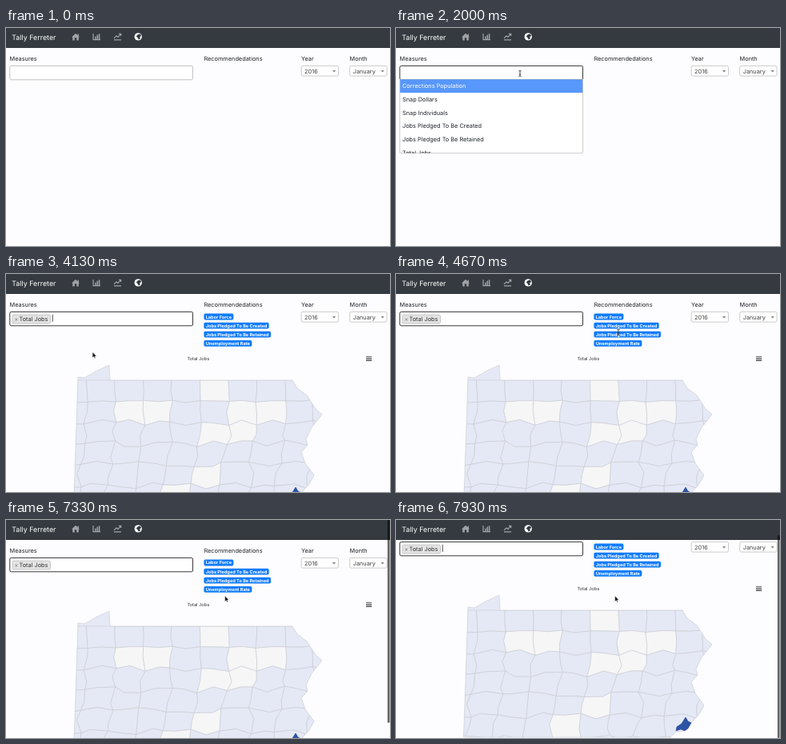
Recreate the animation shown at these times as an HTML page. Size 480 by 273 pixels, loop 8 s.

```html
<!DOCTYPE html>
<html lang="en">
<head>
<meta charset="utf-8">
<title>Measures map</title>
<style>
  html, body { margin: 0; width: 100%; height: 100%; overflow: hidden; background: #fdfcfe; }
  svg { display: block; width: 100%; height: 100%; }
  text {
    font-family: Inter, Roboto, sans-serif; font-size: 7.35px; fill: #212529;
    white-space: pre; text-rendering: geometricPrecision;
  }
</style>
</head>
<body>
<svg id="stage" viewBox="0 0 480 273"></svg>
<script>
const LOOP = 8000;
const ROW = 16.65, MENU_TOP = 64.5;
const stage = document.getElementById('stage');

function add(parent, tag, attrs = {}, text) {
  const el = document.createElementNS('http://www.w3.org/2000/svg', tag);
  for (const k in attrs) el.setAttribute(k, attrs[k]);
  if (text !== undefined) el.textContent = text;
  parent.appendChild(el);
  return el;
}
const group = (parent, attrs) => add(parent, 'g', attrs);
const path = (parent, d, attrs) => add(parent, 'path', { d, ...attrs });
const box = (parent, x, y, width, height, attrs) => add(parent, 'rect', { x, y, width, height, ...attrs });
const label = (parent, x, y, text, style = '') => add(parent, 'text', { x, y, style }, text);
const show = (el, on) => el.setAttribute('display', on ? 'inline' : 'none');

// Page
box(stage, 0, 0, 480, 273, { fill: '#fdfcfe' });
const page = group(stage);
label(page, 4.6, 40.7, 'Measures');
label(page, 247.4, 40.7, 'Recommendedations');
label(page, 369, 40.7, 'Year');
label(page, 429.6, 40.7, 'Month');

function select(x, value) {
  box(page, x, 47.4, 46.3, 12.7, { rx: 1.8, fill: '#fff', stroke: '#aaa', 'stroke-width': .6 });
  label(page, x + 3.9, 56.7, value, 'fill:#444');
  path(page, `M${x + 38.7} 52.9h4.4l-2.2 2.5z`, { fill: '#888' });
}
select(369.2, '2016');
select(429.8, 'January');

const field = box(page, 4.8, 47.4, 228.7, 17.4, { rx: 1.8, fill: '#fff' });
const typed = label(page, 7.6, 58.4, '');

const tag = group(page);
box(tag, 8, 51.2, 47.5, 10.8, { rx: 1.8, fill: '#e4e4e4', stroke: '#aaa', 'stroke-width': .6 });
label(tag, 10.6, 59.3, '×', 'fill:#999;font-weight:700;font-size:7px');
label(tag, 16.5, 59.3, 'Total Jobs', 'fill:#333');
const caret = box(page, 57.8, 50.8, .8, 9, { fill: '#222' });

// Recommendations and chart heading
const results = group(page);
['Labor Force', 'Jobs Pledged To Be Created', 'Jobs Pledged To Be Retained', 'Unemployment Rate'].forEach((name, i) => {
  const y = 49.6 + i * 11.1;
  const badge = box(results, 247.4, y, 0, 7.8, { rx: 1.8, fill: '#0f7bfa' });
  const text = label(results, 249.7, y + 5.9, name, 'fill:#fff;font-weight:700;font-size:5.6px');
  badge.setAttribute('width', text.getComputedTextLength() + 4.7);
});
add(results, 'text', { x: 240.3, y: 107.9, 'text-anchor': 'middle', style: 'font-size:5.7px;fill:#333' }, 'Total Jobs');
path(results, 'M450 103.8h7.2m-7.2 2.3h7.2m-7.2 2.3h7.2', { stroke: '#444', 'stroke-width': 1.1 });

// Map: a jittered grid of counties clipped to the state outline
const border = 'M90 109L98 110 114 101 129 94 130 113H358L364 123 376 132 387 149 395 156' +
  ' 382 172 375 187 377 194 369 203 374 217 385 232 379 243 369 254 361 264 350 265 343 272H84.5L86 230Z';
const clip = add(add(stage, 'defs'), 'clipPath', { id: 'state' });
path(clip, border);

let seed = 11;
function jitter(size) {
  seed = (seed * 16807) % 2147483647;
  return (seed / 2147483647 - .5) * 2 * size;
}

const COLS = 10, ROWS = 6, STEP_X = 17.75, STEP_Y = 13.25;
const line = { stroke: '#c8cad1', 'stroke-width': .6, 'stroke-linejoin': 'round' };
const map = group(results, { transform: 'translate(0 20)' });
path(map, border, { fill: '#e5e9f5' });
const counties = group(map, { 'clip-path': 'url(#state)', ...line });

// Two grid steps per county, so every edge has a bend; the south leans west
const nodes = [];
for (let q = 0; q <= 2 * ROWS; q++) {
  const rough = Math.min(q, 5) * .9, lean = 2 * Math.max(0, q - 5);
  nodes.push(Array.from({ length: 2 * COLS + 1 }, (_, p) =>
    [65 + p * STEP_X - lean + jitter(rough), 113 + q * STEP_Y + jitter(rough)]));
}
const ring = (c, r) => [[0, 0], [1, 0], [2, 0], [2, 1], [2, 2], [1, 2], [0, 2], [0, 1]]
  .map(([p, q]) => nodes[2 * r + q][2 * c + p]);

const empty = ['5,0', '2,1', '3,1', '6,1', '7,1', '5,2', '6,2', '5,4', '4,5'];
for (let r = 0; r < ROWS; r++) {
  for (let c = 0; c < COLS; c++) {
    const fill = empty.includes(`${c},${r}`) ? '#f6f6f7' : '#e5e9f5';
    path(counties, `M${ring(c, r).join('L')}Z`, { fill });
  }
}
path(map, border, { fill: 'none', ...line });
path(map, 'M350 264L351 259 357 255 362 247 365 252 369 254 365 261 361 264 356 262Z',
  { fill: '#2d53a5', stroke: '#24468f', 'stroke-width': .6 });

// Dropdown
const menu = group(stage);
const menuBox = box(menu, 4.8, MENU_TOP, 228.7, 50, { fill: '#fff', stroke: '#aaa', 'stroke-width': .6, rx: 1 });
const hover = box(menu, 5.1, 0, 228.1, ROW, { fill: '#5897fb' });
const menuClip = add(add(stage, 'defs'), 'clipPath', { id: 'menu' });
box(menuClip, 4, MENU_TOP, 230, 92.2);
const rowsBox = group(menu, { 'clip-path': 'url(#menu)' });
const options = ['Corrections Population', 'Snap Dollars', 'Snap Individuals',
  'Jobs Pledged To Be Created', 'Jobs Pledged To Be Retained', 'Total Jobs'];
const rows = options.map(name => label(rowsBox, 8, 0, name));

// Header
box(stage, 0, 0, 480, 25, { fill: '#343a40' });
label(stage, 7.3, 15, 'Tally Ferreter', 'fill:#fff;font-size:8.9px');
const gray = '#a0a3a6';
path(stage, 'M82 11.5L87 6.8 89.6 9.2V7.4H91V10.5L92 11.5H90.8V15.5H88.2V12.3H85.8V15.5H83.2V11.5Z', { fill: gray });
path(stage, 'M109 7V14.7H118', { fill: 'none', stroke: gray, 'stroke-width': 1.2 });
path(stage, 'M112 14V10.5M114.3 14V8.5M116.6 14V7.2', { stroke: gray, 'stroke-width': 1.5 });
path(stage, 'M135 14.8H144M135 12.8L138 9.8 140 11.4 143.4 7.6M141 7.3H143.7V10', { fill: 'none', stroke: gray, 'stroke-width': 1.2 });
add(stage, 'circle', { cx: 165.2, cy: 10.9, r: 4.7, fill: '#fff' });
path(stage, 'M165 8L168 7.4 169 10 167.2 11.2 168 13.3 165.8 14.4 164.4 12 162.8 10.6Z', { fill: '#343a40' });

const bar = box(stage, 476.9, 0, 2.7, 254, { rx: 1.3, fill: '#000', opacity: .6 });

// Pointers, each drawn around its hot spot
const pointer = group(stage);
const shapes = {
  arrow: path(pointer, 'M0 0V7.2L1.7 5.7 2.8 8 3.9 7.5 2.9 5.3H5.1Z', { fill: '#111', stroke: '#fff', 'stroke-width': .5 }),
  beam: path(pointer, 'M-1.6 -3.6Q0 -3.6 0 -2.6Q0 -3.6 1.6 -3.6M0 -2.6V2.6M-1.6 3.6Q0 3.6 0 2.6Q0 3.6 1.6 3.6M-.8 1H.8',
    { fill: 'none', stroke: '#222', 'stroke-width': .8 }),
  hand: path(pointer, 'M-1.2 -3.6Q-.4 -4.4 .2 -3.4L.6 -1.2 3 -.7Q4 -.3 3.7 1.2L3 4H-.6L-2.8 1Q-2.8 -.1 -1.4 .5Z',
    { fill: '#fff', stroke: '#222', 'stroke-width': .7 })
};

const entry = { x: 166, y: 152 };
const moves = [
  { from: 70, to: 440, x: 155, y: 57 },
  { from: 2400, to: 3100, x: 84.5, y: 91.5 },
  { from: 3270, to: 3560, x: 38, y: 108 },
  { from: 3870, to: 4600, x: 278, y: 73 },
  { from: 4750, to: 5400, x: 268, y: 56 },
  { from: 5600, to: 6120, x: 275, y: 87 },
  { from: 6470, to: 7200, x: 273.6, y: 95 }
];

const ease = k => k * k * (3 - 2 * k);
const ramp = (t, a, b) => ease(Math.min(1, Math.max(0, (t - a) / (b - a))));

function position(t) {
  let { x, y } = entry;
  for (const move of moves) {
    const k = ramp(t, move.from, move.to);
    x += (move.x - x) * k;
    y += (move.y - y) * k;
  }
  return [x, y];
}

function drawMenu(t, y) {
  const open = t >= 1530 && t < 3600;
  show(menu, open);
  if (!open) return;
  const filtered = t >= 2100;
  const first = filtered ? 3 : 0;
  const active = Math.max(0, Math.min(2, Math.floor((y - MENU_TOP) / ROW)));
  menuBox.setAttribute('height', filtered ? 3 * ROW : 92.2);
  hover.setAttribute('y', MENU_TOP + active * ROW);
  rows.forEach((row, i) => {
    show(row, i >= first);
    row.setAttribute('y', MENU_TOP + 10.9 + (i - first) * ROW);
    row.style.fill = i - first === active ? '#fff' : '#212529';
  });
}

function draw(t) {
  const [x, y] = position(t);
  const focused = t >= 1430;
  const picked = t >= 3600;
  const scroll = 20 * ramp(t, 7330, 7560);

  field.setAttribute('stroke', focused ? '#222' : '#aaa');
  field.setAttribute('stroke-width', focused ? .9 : .7);
  const count = t < 2100 || picked ? 0 : Math.min(3, 1 + Math.floor((t - 2100) / 90));
  typed.textContent = 'job'.slice(0, count);
  show(tag, picked);
  show(caret, picked && (t + 310) % 1000 < 500);
  show(results, t >= 4000);
  page.setAttribute('transform', `translate(0 ${-scroll})`);
  show(bar, t >= 7330);
  bar.setAttribute('y', scroll * .95);
  drawMenu(t, y);

  const inMenu = t >= 1530 && t < 3600 && y > MENU_TOP;
  const inField = x < 234 && y > 47 && y < MENU_TOP;
  const onBadge = t >= 4000 && x > 247 && y < 91;
  const kind = inMenu ? 'hand' : inField || onBadge ? 'beam' : 'arrow';
  for (const k in shapes) show(shapes[k], k === kind);
  show(pointer, t >= 70);
  pointer.setAttribute('transform', `translate(${x} ${y})`);
}

const start = performance.now();
function tick() {
  draw((performance.now() - start) % LOOP);
  requestAnimationFrame(tick);
}
tick();
</script>
</body>
</html>
```
